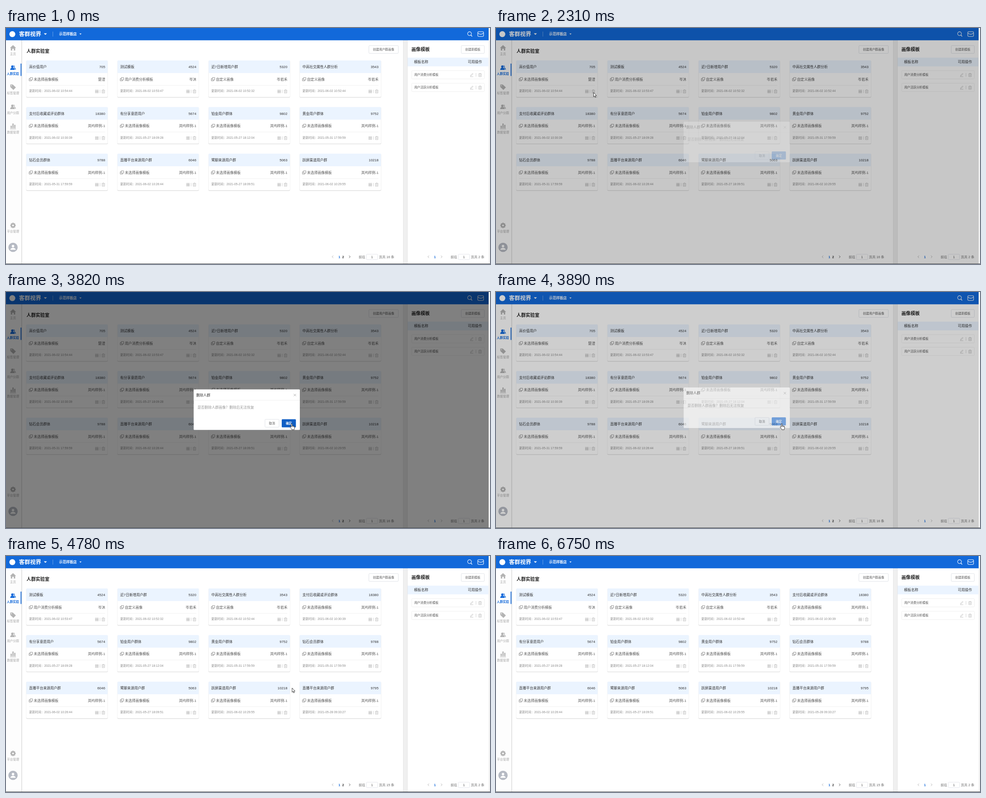
An HTML page that plays this animation: 1069x524 px, repeating every 6.78 s.

```html
<!DOCTYPE html>
<html lang="zh-CN">
<head>
<meta charset="utf-8">
<title>人群实验室</title>
<style>
html, body { margin: 0; width: 100%; height: 100%; overflow: hidden; background: #fff; }
svg { display: block; width: 100vw; height: 100vh; }
text { font-family: "Liberation Sans", "Noto Sans CJK SC", "Noto Sans CJK", sans-serif; white-space: pre; }
</style>
</head>
<body>
<svg id="stage" viewBox="0 0 1069 524" xmlns="http://www.w3.org/2000/svg"></svg>
<script>
const LOOP = 6780;
const BLUE = '#1269da', FOCUS = '#4187e1', PRESSED = '#105fc4';
const BAND = '#ebf4ff', INK = '#333', SOFT = '#bababa';
const S = 6.7, M = 7.8;

// ---- drawing helpers; text is placed by its vertical centre ----
const rect = (x, y, w, h, fill, more = '') =>
  `<rect x="${x}" y="${y}" width="${w}" height="${h}" fill="${fill}" ${more}/>`;
const circle = (x, y, r, fill, more = '') =>
  `<circle cx="${x}" cy="${y}" r="${r}" fill="${fill}" ${more}/>`;
const line = (d, color, w = 0.8) =>
  `<path d="${d}" fill="none" stroke="${color}" stroke-width="${w}"/>`;
const shape = (d, fill, more = '') => `<path d="${d}" fill="${fill}" ${more}/>`;
const text = (s, x, y, size, fill = INK, anchor = 'start', weight = 400) =>
  `<text x="${x}" y="${y + size * 0.37}" font-size="${size}" fill="${fill}" text-anchor="${anchor}" font-weight="${weight}">${s}</text>`;
const at = (x, y, body) => `<g transform="translate(${x} ${y})">${body}</g>`;

const trash = (x, y, color = SOFT) => at(x, y,
  line('M-3.7-2.5H3.7M-1.3-2.6V-3.7H1.3V-2.6', color) +
  line('M-2.8-2V3.6H2.8V-2M-.9-.8V2.2M.9-.8V2.2', color));
const grid = (x, y) => at(x, y, [[-3.2, -3], [0.6, -3], [-3.2, 0.7], [0.6, 0.7]]
  .map(([a, b]) => rect(a, b, 2.6, 2.5, 'none', `stroke="${SOFT}" stroke-width=".8"`)).join(''));
const pencil = (x, y) => at(x, y,
  line('M-2.6 2.2L-2.1.4 2-3.5 3.2-2.3-.9 1.7Z', SOFT) + line('M-3.5 3.8H3.6', SOFT));
const stack = (x, y) => at(x, y,
  line('M-1.5-3.6H3.8V1.4H-1.5Z', '#777') + line('M-2-1.4H-3.8V3.6H1.6V2', '#777'));
const users = (x, y, c) => at(x, y,
  shape('M1-4.6A2.5 2.5 0 0 1 3.1-.3Q6.2.8 6.3 4.6H4.8Q4.6 1.5 2 .2 3.8-2 1-4.6Z', c) +
  circle(-1.4, -2.3, 2.7, c) + shape('M-6.2 4.9Q-6 .8-2.6.2H-.2Q3.6.8 3.8 4.9Z', c));
const triangle = (x, y, w) => shape(`M${x - w} ${y - w / 2}H${x + w}L${x} ${y + w / 2}Z`, '#fff');
const chevron = (x, dir, color) =>
  line(`M${x - 1.3 * dir} 505.4L${x + 1.3 * dir} 508 ${x - 1.3 * dir} 510.6`, color, 0.9);
const button = (x, y, w, h, label) =>
  rect(x, y, w, h, '#fff', 'rx="1.5" stroke="#d9dce2" stroke-width=".8"') +
  text(label, x + w / 2, y + h / 2, S, '#555', 'middle');

// ---- cards: title, count, template, owner, date ----
const NONE = '未选择画像模板', OWN = '自定义画像', DEMO = '岚屿样例-1', LEAD = '岑若禾';
const people = [
  ['高价值用户', 705, NONE, '楚澄', '06-02 10:54:44'],
  ['测试模板', 4524, '用户消费分析模板', '岑沐', '06-02 10:53:47'],
  ['近7日新增用户群', 5320, OWN, LEAD, '06-02 10:52:32'],
  ['中高社交属性人群分析', 3543, OWN, LEAD, '06-02 10:52:44'],
  ['支付后收藏或评论群体', 18380, NONE, DEMO, '06-02 10:30:39'],
  ['有分享意愿用户', 5674, NONE, DEMO, '05-27 18:09:28'],
  ['铂金用户群体', 9802, NONE, DEMO, '05-27 18:12:04'],
  ['黄金用户群体', 9752, NONE, DEMO, '05-31 17:59:59'],
  ['钻石会员群体', 9788, NONE, DEMO, '05-31 17:59:59'],
  ['直播平台来源用户群', 6046, NONE, DEMO, '06-02 10:26:44'],
  ['鹭聊来源用户群', 5063, NONE, DEMO, '05-27 18:09:51'],
  ['跃屏渠道用户群', 10218, NONE, DEMO, '06-02 10:29:55'],
  ['直播平台来源用户群', 9795, NONE, DEMO, '05-28 09:33:27']
];

function card([title, count, template, owner, date], i) {
  const x = 45 + (i % 4) * 201.25, y = 72 + Math.floor(i / 4) * 103.5;
  return at(x, y,
    rect(-0.6, 0.6, 180.7, 82, '#ededed', 'rx="2"') +
    rect(0, 1, 179.5, 81.4, '#dedede', 'rx="2"') +
    rect(0, 0, 179.5, 81.3, '#fff', 'rx="2"') +
    rect(0, 0, 179.5, 28, BAND, 'rx="1.5"') +
    text(title, 6, 14.2, M) + text(count, 174, 14.2, M, INK, 'end') +
    stack(9.8, 41.7) + text(template, 16.3, 41.7, M, '#555') +
    text(owner, 174, 41.7, M, '#555', 'end') +
    line('M6 55.3H174', '#ececec') +
    text('更新时间：2021-' + date, 6, 67.6, S, '#888') +
    grid(155.7, 68.8) + line('M162.7 65V72.5', '#ccc') + trash(170, 68.8));
}

const jump = (x, total) =>
  text('前往', x, 508.5, 7.24, '#666') +
  rect(x + 17, 502.3, 25, 12, '#fff', 'rx="1.5" stroke="#dcdfe6" stroke-width=".8"') +
  text('1', x + 29.5, 508.5, 7.24, '#555', 'middle') +
  text(`页共 ${total} 条`, x + 44.8, 508.5, 7.24, '#666');

const lab = (first, total) =>
  people.slice(first, first + 12).map(card).join('') + jump(779, total);

function templateRow(name, y) {
  return rect(896, y - 9.3, 160.5, 18.4, '#fff', 'rx="1.5" stroke="#efefef" stroke-width=".9"') +
    text(name, 901.7, y, S, '#555') + pencil(1028.5, y + 0.3) +
    line(`M1038 ${y - 4}V${y + 4}`, '#ccc') + trash(1047, y + 0.4);
}

function sidebar() {
  const c = '#b3b3b3';
  const label = (s, y) => text(s, 15.5, y, S, '#a6a6a6', 'middle');
  const teeth = [0, 45, 90, 135].map(a =>
    rect(-1.5, -6, 3, 12, c, `rx=".6" transform="rotate(${a})"`)).join('');
  return rect(0, 27, 34, 496, '#fdfdfd') +
    rect(34, 27, 1, 496, '#d9d9d9') + rect(35, 27, 1, 496, '#efefef') +
    shape('M15.5 38L22.3 44.3H20.3V50H17.2V46H13.8V50H10.7V44.3H8.7Z', c) + label('主页', 58) +
    users(15.5, 88, BLUE) + text('人群实验', 15.2, 101.7, S, BLUE, 'middle', 700) +
    rect(32.3, 79, 1.8, 27.5, BLUE) +
    shape('M9.5 125.5H15L21.8 132 16.3 137.6 9.5 131Z', c) + circle(12.2, 128.2, 1, '#fff') +
    label('标签管理', 145) +
    users(15.5, 175, c) + label('用户分群', 188.5) +
    rect(10.2, 217, 2.6, 5.5, c) + rect(14.2, 212, 2.6, 10.5, c) + rect(18.2, 215, 2.6, 7.5, c) +
    rect(9, 223.6, 13, 1, c) + label('数据管理', 232) +
    at(15.5, 438.3, teeth + circle(0, 0, 4.5, c) + circle(0, 0, 1.9, '#fdfdfd')) +
    label('平台管理', 452) +
    circle(15.5, 487, 10.3, '#b6bac3') + circle(15.5, 484.2, 2.8, '#fff') +
    shape('M9.6 492.6Q10.2 488 15.5 488T21.4 492.6Z', '#fff');
}

function header() {
  return rect(0, 0, 1066, 27.3, BLUE) +
    circle(14, 13.6, 6.6, '#fff') +
    text('客群视界', 28.7, 13.8, 12.25, '#fff', 'start', 700) + triangle(87, 13.5, 3.4) +
    rect(103, 8, 0.9, 11, '#6ea4ea') +
    text('示范样板店', 117.3, 13.5, M, '#fff', 'start', 700) + triangle(164.5, 13.5, 2.3) +
    circle(1023.8, 12.6, 4.2, 'none', 'stroke="#fff" stroke-width="1.1"') +
    line('M1026.8 15.8L1029.6 18.8', '#fff', 1.3) +
    rect(1042, 8.3, 12.8, 10.4, 'none', 'rx="1.6" stroke="#fff" stroke-width="1.1"') +
    line('M1042.3 11.5Q1048.4 16.2 1054.5 11.5', '#fff', 1.1);
}

function panels() {
  const page = (s, x, color) => text(s, x, 508.2, 7.24, color, 'middle', 700);
  return rect(0, 0, 1069, 524, '#fff') +
    rect(877.5, 27, 9.5, 496, '#f0f0f0') + rect(877.2, 27, 0.8, 496, '#e2e2e2') +
    rect(886.2, 27, 0.8, 496, '#e2e2e2') +
    text('人群实验室', 45.3, 50.8, 10.1, '#222', 'start', 700) +
    button(801.5, 39, 65, 17.3, '创建用户群画像') +
    text('画像模板', 895.5, 47.6, 10.1, '#222', 'start', 700) +
    button(1005.5, 39, 51, 17.3, '创建新模板') +
    rect(887, 65.8, 178.5, 19.4, BAND) +
    text('模板名称', 901.3, 75.4, M) + text('可用操作', 1051.2, 75.4, M, INK, 'end') +
    templateRow('用户消费分析模板', 104) + templateRow('用户活跃分析模板', 132) +
    chevron(721.5, -1, '#aaa') + page('1', 736.3, BLUE) + page('2', 744.5, INK) +
    chevron(759, 1, '#444') +
    chevron(933, -1, '#aaa') + page('1', 947.3, BLUE) + chevron(962, 1, '#aaa') +
    jump(982, 2);
}

const dialog = rect(414.5, 216.3, 234.5, 90, '#fff', 'rx="1.5"') +
  text('删除人群', 420, 228.7, M) +
  line('M635.5 226.2L640.7 231.4M640.7 226.2L635.5 231.4', '#999') +
  line('M414.5 240.5H649', '#eee') +
  text('是否删除人群画像？删除后无法恢复', 423, 256, M, '#999') +
  button(572, 282.8, 31, 17.4, '取消') +
  rect(609, 282.4, 31.3, 18.1, FOCUS, 'id="ok" rx="1.5"') +
  text('确定', 624.6, 291.6, S, '#fff', 'middle', 700);

const outline = 'stroke="#111" stroke-width=".8" stroke-linejoin="round"';
const arrow = shape('M0 0V9.4L2.1 7.5 3.6 10.9 5.1 10.2 3.6 7H6.6Z', '#fff', outline + ' id="arrow"');
const hand = '<g id="hand">' +
  shape('M-1 7.5V1Q-1-.3.1-.3T1.2 1V5Q2.2 4.2 3.2 5.2 4.3 4.6 5 5.7 6.3 5.4 6.4 7V9.5Q6.3 11 5.5 12V13.3H.3V12.3Q-1.2 10.8-3.3 7.8-3.6 6.6-2.4 6.5-1.6 6.7-1 7.5Z', '#fff', outline) +
  line('M1.2 5V7.2M3.2 5.2V7.4M5 5.7V7.6', '#111', 0.6) + '</g>';

document.getElementById('stage').innerHTML =
  panels() + sidebar() + header() +
  `<g id="before">${lab(0, 16)}</g><g id="after">${lab(1, 15)}</g>` +
  `<g id="hot">${trash(215, 140.8, '#4ba3f5')}${rect(212.2, 138.8, 5.6, 5.6, '#4ba3f5')}</g>` +
  rect(0, 0, 1066, 524, '#000', 'id="shade"') +
  rect(1066, 0, 3, 524, '#f1f1f1') + rect(0, 523, 1069, 1, '#4c4f52') +
  `<g id="dialog">${dialog}</g><g id="cursor">${arrow}${hand}</g>`;

const el = {};
document.querySelectorAll('[id]').forEach(n => { el[n.id] = n; });

// ---- motion ----
const clamp = v => Math.min(1, Math.max(0, v));
const smooth = p => (1 - Math.cos(Math.PI * p)) / 2;
const out = p => 1 - (1 - p) ** 2;
const push = p => p ** 1.6;
const linear = p => p;

// cubic-bezier(.25, .1, .25, 1)
function ease(x) {
  if (x <= 0 || x >= 1) return clamp(x);
  let lo = 0, hi = 1, u = x;
  for (let i = 0; i < 24; i++) {
    u = (lo + hi) / 2;
    const v = 1 - u;
    if (0.75 * u * v * v + 0.75 * u * u * v + u ** 3 < x) lo = u; else hi = u;
  }
  const v = 1 - u;
  return 0.3 * u * v * v + 3 * u * u * v + u ** 3;
}

// start, end, from, to, easing
const moves = [
  [250, 930, [1011, 522], [229, 183], out],
  [930, 1330, [229, 183], [215.5, 143.3], smooth],
  [2740, 3420, [215.5, 143.3], [612, 295.5], smooth],
  [3440, 3700, [612, 295.5], [631, 292.5], smooth],
  [4760, 5440, [631, 292.5], [858, 431], push],
  [5440, 5830, [858, 431], [1036, 526], linear]
];

function cursorAt(t) {
  const [start, end, a, b, curve] = moves.filter(m => m[0] <= t).pop() || moves[0];
  const p = curve(clamp((t - start) / (end - start)));
  return [a[0] + (b[0] - a[0]) * p, a[1] + (b[1] - a[1]) * p];
}

const OPEN = 2258, PRESS = 3740, CLOSE = 3820, SWAP = 4050;
const show = (node, on) => node.setAttribute('visibility', on ? 'visible' : 'hidden');
const fade = (t, length) => ease((t - OPEN) / length) - ease((t - CLOSE) / length);

function draw(t) {
  const box = fade(t, 300);
  el.shade.setAttribute('opacity', 0.5 * fade(t, 200));
  show(el.dialog, box > 0);
  el.dialog.setAttribute('opacity', box);
  el.dialog.setAttribute('transform', `translate(0 ${-11.1 * (1 - box)})`);

  const overTrash = t >= 1180 && t < OPEN;
  const overOk = t >= 3420 && t < 4110;
  el.ok.setAttribute('fill', t >= PRESS && t < CLOSE + 30 ? PRESSED : FOCUS);
  show(el.hot, overTrash);
  show(el.before, t < SWAP);
  show(el.after, t >= SWAP);

  const [x, y] = cursorAt(t), isHand = overTrash || overOk;
  const visible = t >= 260 && t < 5820;
  el.cursor.setAttribute('transform', `translate(${x} ${y})`);
  show(el.arrow, visible && !isHand);
  show(el.hand, visible && isHand);
}

function tick() {
  draw(performance.now() % LOOP);
  requestAnimationFrame(tick);
}
tick();
</script>
</body>
</html>
```
